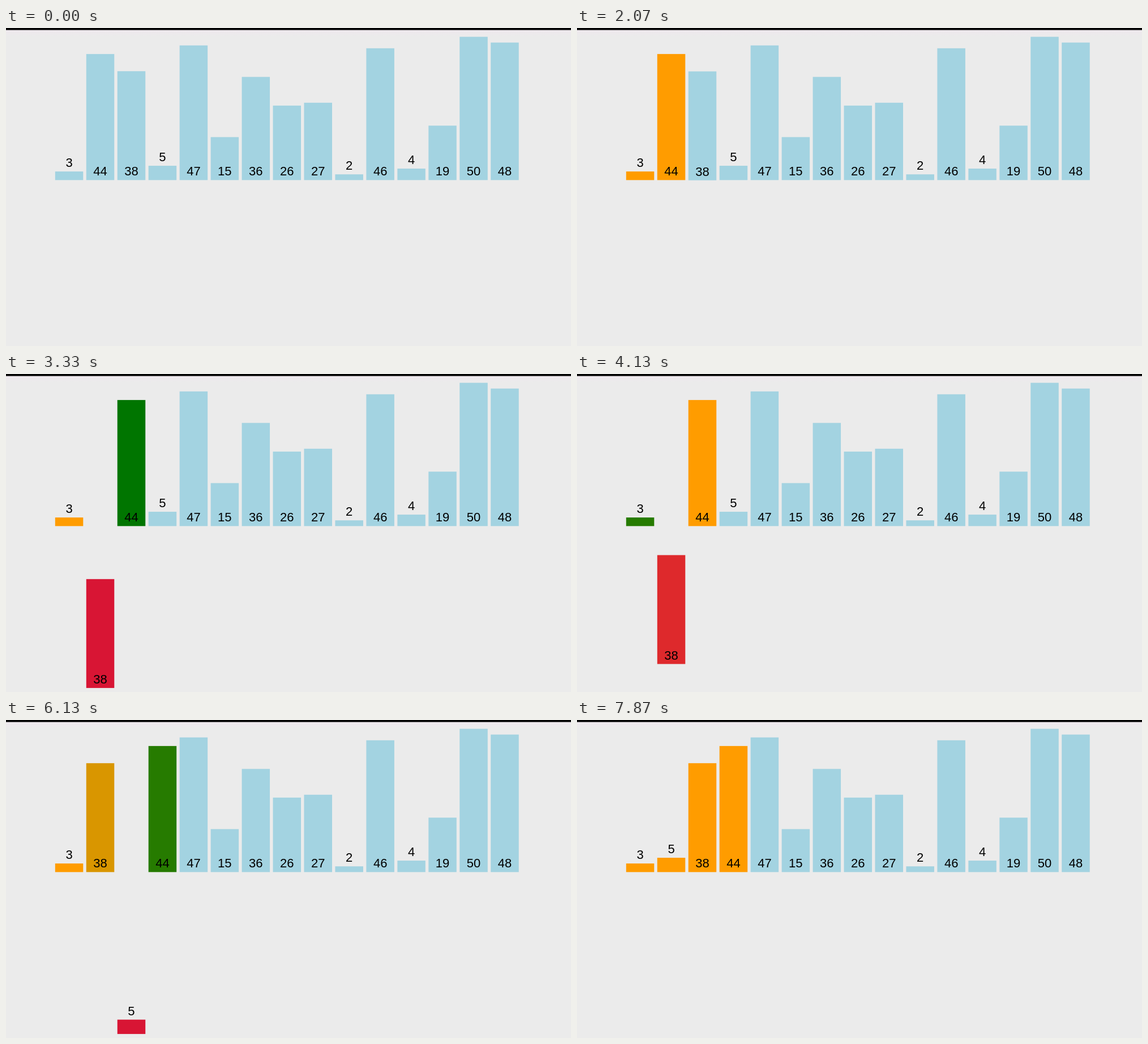
An HTML page that plays this animation: 998x561 px, repeating every 8000 ms.

```html
<!DOCTYPE html>
<html lang="en">
<head>
<meta charset="utf-8">
<title>Insertion sort</title>
<style>
  html, body { margin: 0; width: 100%; height: 100%; overflow: hidden; background: #ebebeb; }
  svg { display: block; width: 100%; height: 100%; }
  text { font: 22px "Liberation Sans", Arial, sans-serif; text-anchor: middle; }
</style>
</head>
<body>
<svg id="stage" viewBox="0 0 998 561">
  <defs>
    <linearGradient id="tint" x1="0" y1="0" x2="0" y2="1">
      <stop offset="0" stop-color="#efe8ee"/>
      <stop offset="1" stop-color="#ebebeb"/>
    </linearGradient>
  </defs>
  <rect width="998" height="561" fill="#ebebeb"/>
  <rect y="3" width="998" height="12" fill="url(#tint)"/>
  <rect width="998" height="3.6"/>
</svg>
<script>
const VALUES = [3, 44, 38, 5, 47, 15, 36, 26, 27, 2, 46, 4, 19, 50, 48];
const IDLE = [163, 211, 225], SORTED = [255, 156, 0], COMPARED = [0, 117, 0], KEY = [216, 21, 52];
const LEFT = 86.8, PITCH = 54.96, WIDTH = 49.5, BASE = 268.3, DROP = 285.6, UNIT = 5.055;
const LOOP = 8000, STEP = 500, FIRST = 50, MOVE = 250, FPS = 15;

// Runs the sort and returns a snapshot of every bar after each step.
function recordSteps(count) {
  const bars = VALUES.map((value, col) => ({ value, col, drop: 0, color: IDLE }));
  const order = [...bars];
  const steps = [];
  const record = () => steps.push(bars.map(bar => ({ ...bar })));

  record();
  order[0].color = SORTED;
  record();
  for (let i = 1; steps.length <= count; i++) {
    const key = order[i];
    Object.assign(key, { drop: 1, color: KEY });
    record();
    let last = null;
    for (let j = i - 1; j >= 0; j--) {
      if (last) last.color = SORTED;
      last = order[j];
      last.color = COMPARED;
      record();
      if (last.value <= key.value) break;
      [order[j], order[j + 1]] = [key, last];
      key.col = j;
      last.col = j + 1;
      record();
    }
    last.color = SORTED;
    Object.assign(key, { drop: 0, color: SORTED });
    record();
  }
  return steps;
}

const stage = document.getElementById('stage');

function add(tag, parent, attrs) {
  const node = document.createElementNS('http://www.w3.org/2000/svg', tag);
  for (const name in attrs) node.setAttribute(name, attrs[name]);
  return parent.appendChild(node);
}

const views = VALUES.map(value => {
  const height = value * UNIT;
  const group = add('g', stage, {});
  const rect = add('rect', group, { y: -height, width: WIDTH, height });
  const labelY = value < 10 ? -height - 8 : -8;
  add('text', group, { x: WIDTH / 2, y: labelY }).textContent = value;
  return { group, rect };
});

const steps = recordSteps(LOOP / STEP);
const mix = (a, b, p) => a + (b - a) * p;
const cubicInOut = t => t < 0.5 ? 4 * t ** 3 : 1 - 4 * (1 - t) ** 3;

function render(ms) {
  const since = Math.max(0, ms - FIRST);
  const index = Math.floor(since / STEP);
  const p = cubicInOut(Math.min(1, (since % STEP) / MOVE));
  views.forEach(({ group, rect }, i) => {
    const from = steps[index][i], to = steps[index + 1][i];
    const x = LEFT + PITCH * mix(from.col, to.col, p);
    const y = BASE + DROP * mix(from.drop, to.drop, p);
    const rgb = from.color.map((c, k) => Math.round(mix(c, to.color[k], p)));
    group.setAttribute('transform', `translate(${x} ${y})`);
    rect.setAttribute('fill', `rgb(${rgb})`);
  });
}

function tick() {
  // The picture advances at 15 frames per second, with times rounded to 10 ms.
  const ms = performance.now() % LOOP;
  const frame = Math.floor((ms + 4) * FPS / 1000) % (LOOP * FPS / 1000);
  render(frame * 1000 / FPS);
  requestAnimationFrame(tick);
}
tick();
</script>
</body>
</html>
```
